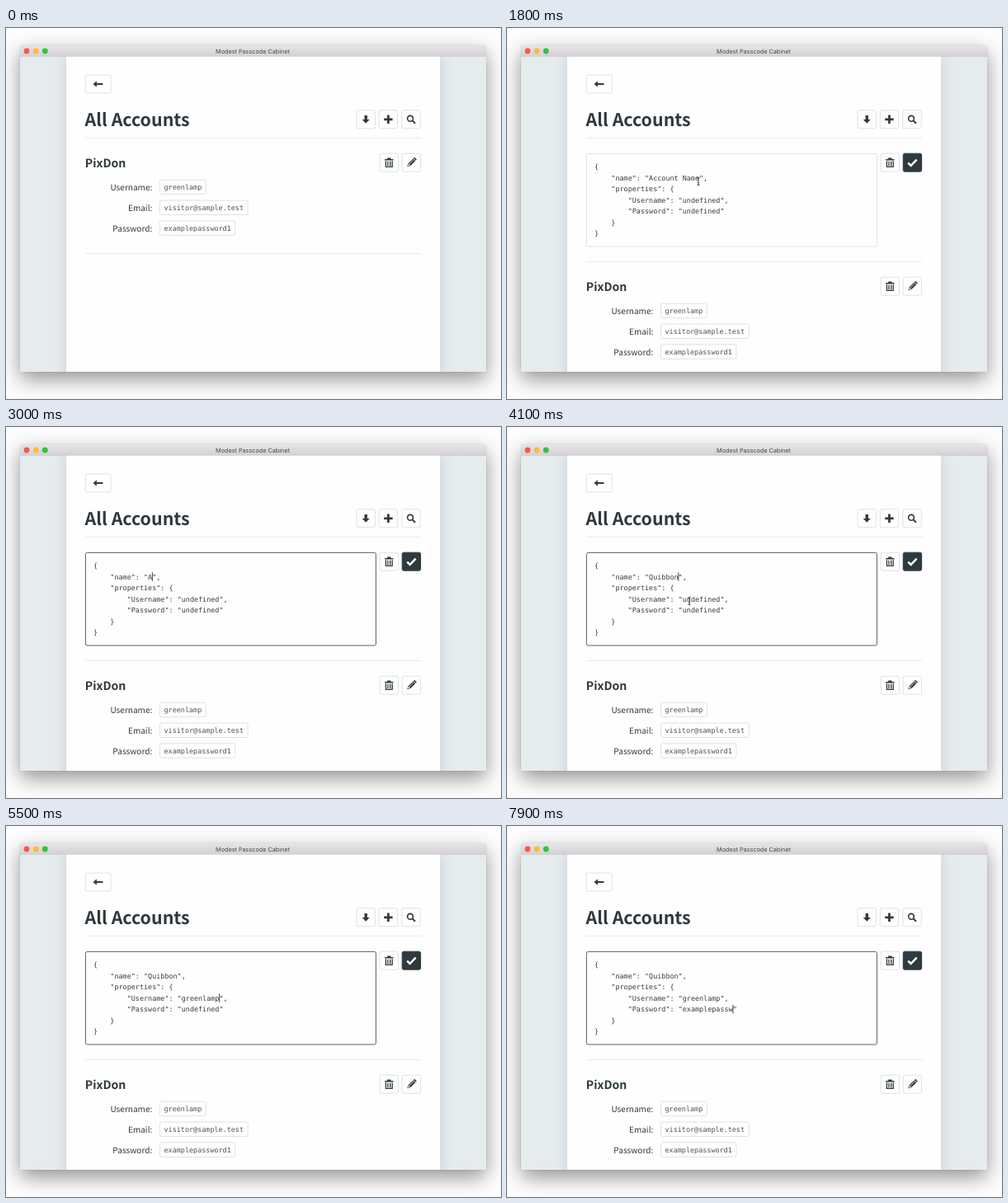
An HTML page that plays this animation: 600 by 450 pixels, repeating every 8000 ms.

```html
<!DOCTYPE html>
<html lang="en">
<head>
<meta charset="utf-8">
<title>Accounts</title>
<style>
  html, body { margin: 0; width: 100%; height: 100%; overflow: hidden; background: #fdfdfd; }
  .window {
    position: absolute; left: 17px; top: 21px; width: 565px; height: 396px;
    border-radius: 4px 4px 1px 1px; overflow: hidden; background: #e6ebee;
  }
  .shadow {
    position: absolute; left: 17px; top: 21px; width: 565px; height: 396px; border-radius: 4px;
    box-shadow: 0 9px 24px rgba(0,0,0,.42), 0 0 1px rgba(0,0,0,.4);
  }
  .bar {
    position: absolute; left: 0; top: 0; width: 100%; height: 13px;
    background: linear-gradient(#e7e5e7, #d3d1d3); box-shadow: 0 .5px 0 #b9b7b9;
  }
  .panel {
    position: absolute; left: 56px; top: 13px; width: 452.5px; height: 390px;
    background: #fefefe; box-shadow: 0 0 14px rgba(70,90,100,.2);
  }
  svg { position: absolute; left: 0; top: 0; display: block; text-rendering: geometricPrecision; }
  text { fill: #2f393d; font-family: "Noto Sans CJK JP", "Noto Sans CJK SC", "Noto Sans", sans-serif; }
  .ui { font-family: Inter, sans-serif; }
  .mono { font: 8.45px "DejaVu Sans Mono", monospace; fill: #343d41; }
  .badge .mono { fill: #4b555a; }
  .label { font-size: 10.07px; text-anchor: end; }
  .box { fill: #fefefe; stroke: #dee2e5; stroke-width: 1; }
  .rule { stroke: #e7eaed; }
  .ink { fill: #2f393d; }
  .line { fill: none; stroke: #2f393d; }
</style>
</head>
<body>
<div class="shadow"></div>
<div class="window"><div class="panel"></div><div class="bar"></div></div>
<svg width="600" height="450" viewBox="0 0 600 450">
  <defs>
    <clipPath id="view"><rect x="17" y="34" width="565" height="383"/></clipPath>
    <rect id="btn" x="-11.2" y="-11" width="22.4" height="22" rx="2"/>
    <g id="trash">
      <use href="#btn" class="box"/>
      <path class="ink" d="M-5.2-4.1H-2.2V-5.6H2.2V-4.1H5.2V-2.7H-5.2Z"/>
      <path class="line" stroke-width="1.3" d="M-3.9-2V5.2H3.9V-2M-1.4-1.5V4M1.4-1.5V4"/>
    </g>
    <g id="pencil">
      <use href="#btn" class="box"/>
      <g transform="rotate(45)">
        <path class="ink" d="M-1.9-7.2H1.9V-5.5H-1.9ZM-1.9-4.8H1.9V3.4L0 7.3L-1.9 3.4Z"/>
        <path d="M-.5-4V3M.7 3.6L0 5.2L-.7 3.6Z" fill="#fefefe" stroke="#fefefe" stroke-width=".7"/>
      </g>
    </g>
  </defs>

  <circle cx="25" cy="28" r="3.4" fill="#f9564f"/>
  <circle cx="36.2" cy="28" r="3.4" fill="#fbbc36"/>
  <circle cx="47.3" cy="28" r="3.4" fill="#2fc441"/>
  <text class="ui" x="299" y="30.7" font-size="7.25" text-anchor="middle" style="fill:#484648">Modest Passcode Cabinet</text>

  <g clip-path="url(#view)">
    <rect class="box" x="96.2" y="57" width="31" height="22" rx="2"/>
    <path class="ink" d="M105.6 68l4.3-3.7v2.6h7.5v2.2h-7.5v2.6z"/>
    <text x="95.6" y="119.4" font-size="21.4" font-weight="700">All Accounts</text>
    <path class="rule" d="M96 133.5H503.5"/>

    <g transform="translate(436.2 110.8)">
      <use href="#btn" class="box"/>
      <path class="ink" d="M0 4.9l-4.5-4.7h2.8v-4.9h3.4v4.9h2.8z"/>
    </g>
    <g transform="translate(463.4 110.8)">
      <use href="#btn" class="box" id="add"/>
      <path class="line" stroke-width="2.7" d="M-5.2 0H5.2M0-5.2V5.2"/>
    </g>
    <g transform="translate(491 110.8)">
      <use href="#btn" class="box"/>
      <circle class="line" stroke-width="1.6" cx="-1" cy="-1" r="3.4"/>
      <path class="line" stroke-width="2" d="M1.6 1.6L5 5"/>
    </g>

    <g id="editor">
      <rect id="area" class="box" x="96.4" y="152.4" width="352" height="112.6" rx="2"/>
      <rect id="sel" height="12" fill="#b4d6fd"/>
      <g id="code"></g>
      <rect id="caret" width=".8" height="10.4" fill="#111"/>
      <use href="#trash" x="464.3" y="163.2"/>
      <g transform="translate(491.4 163.2)">
        <use href="#btn" fill="#2f3a3f" stroke="#2f3a3f"/>
        <path d="M-5.2.4L-1.8 3.8L5.2-3.6" fill="none" stroke="#fff" stroke-width="2.5"/>
      </g>
      <path class="rule" d="M96 283.5H503.5"/>
    </g>

    <g id="account">
      <text x="95.8" y="169.4" font-size="14.1" font-weight="600">PixDon</text>
      <use href="#trash" x="464.3" y="163.2"/>
      <use href="#pencil" x="491.4" y="163.2"/>
      <g id="fields"></g>
      <path class="rule" d="M96 273.5H503.5"/>
    </g>

    <g id="tip">
      <path d="M463.4 123.6l3.6 4h-7.2z" fill="#111416"/>
      <rect x="436" y="127" width="55" height="15.4" rx="2" fill="#111416"/>
      <text class="ui" x="463.5" y="137.2" font-size="6.7" font-weight="500" text-anchor="middle" style="fill:#fff">Add Account</text>
    </g>

    <g id="mouse">
      <path id="arrow" d="M0 0V8.2L1.9 6.5L3.2 9.5L4.6 8.9L3.3 6H5.8Z" fill="#111" stroke="#fff" stroke-width=".6"/>
      <path id="hand" d="M-1.3-3.4Q-.6-4.4 0-3.4V-.6L3-.1Q4 .2 3.8 1.4L3 4.6H-1L-3.5 1.4Q-3.3 .2-1.3 1.2Z" fill="#fff" stroke="#111" stroke-width=".8"/>
      <path id="beam" d="M-1.7-4.8Q0-4.8 0-3.6Q0-4.8 1.7-4.8M0-4V4M-1.7 4.8Q0 4.8 0 3.6Q0 4.8 1.7 4.8M-1 1.6H1" fill="none" stroke="#222" stroke-width=".8"/>
    </g>
  </g>
</svg>
<script>
const LOOP = 8000, STEP = 100;
const PITCH = 8.45 * 0.602, LEFT = 106, LINE = 13.55;
const $ = id => document.getElementById(id);
const set = (el, attrs) => { for (const k in attrs) el.setAttribute(k, attrs[k]); return el; };
const add = (parent, tag, attrs, text = "") => {
  const el = set(document.createElementNS("http://www.w3.org/2000/svg", tag), attrs);
  el.textContent = text;
  return parent.appendChild(el);
};
const show = (id, on) => { $(id).style.display = on ? "" : "none"; };
const colX = col => LEFT + col * PITCH;
const rowY = row => 171 + row * LINE;

[["Username:", "greenlamp"], ["Email:", "visitor@sample.test"], ["Password:", "examplepassword1"]]
  .forEach(([label, value], i) => {
    const g = add($("fields"), "g", { class: "badge", transform: `translate(0 ${i * 24.8})` });
    add(g, "text", { class: "label", x: 177.3, y: 197 }, label);
    add(g, "rect", { class: "box", x: 186.5, y: 184.3, width: value.length * PITCH + 10, height: 17.4, rx: 2 });
    add(g, "text", { class: "mono", x: 191.5, y: 196.2 }, value);
  });

const indents = [0, 4, 4, 8, 8, 4, 0];
const rows = indents.map((n, i) => add($("code"), "text", { class: "mono", x: colX(n), y: rowY(i) }));

// One key press time per character
const inputs = {
  name: { row: 1, col: 13, old: "Account Name", word: "Quibbon", from: 3100,
    keys: [3300, 3500, 3600, 3600, 3700, 3700, 3800] },
  user: { row: 3, col: 21, old: "undefined", word: "greenlamp", from: 4700,
    keys: [4700, 4800, 4900, 5100, 5200, 5300, 5400, 5400, 5500] },
  pass: { row: 4, col: 21, old: "undefined", word: "examplepassword1", from: 6400,
    keys: [6400, 6600, 6900, 7000, 7100, 7200, 7300, 7600, 7600, 7700, 7700, 7900] }
};
const valueAt = (f, t) => {
  if (t >= f.from) return f.word.slice(0, f.keys.filter(k => k <= t).length);
  return f === inputs.name && t >= 3000 ? "A" : f.old;
};

// Pointer stops: time, x, y
const path = [
  [400, 555.5, 242.5], [600, 555.5, 242.5], [1150, 464, 120], [1450, 464, 120],
  [1800, 232, 186], [2000, 232, 186], [2700, 177, 183], [3950, 177, 183],
  [4100, 221, 211], [5650, 221, 211], [6000, 232, 225.5], [LOOP, 232, 225.5]
];
const pointerAt = t => {
  const i = Math.max(1, path.findIndex(p => p[0] > t));
  const [t0, x0, y0] = path[i - 1], [t1, x1, y1] = path[i];
  const k = Math.min(1, Math.max(0, (t - t0) / (t1 - t0)));
  const e = t0 === 2000 ? k : k * k * (3 - 2 * k);
  return [x0 + (x1 - x0) * e, y0 + (y1 - y0) * e];
};
const within = (t, a, b) => t >= a && t < b;

function drawMouse(t, x, y) {
  const visible = within(t, 400, 3000) || within(t, 4000, 4700) || within(t, 5700, 6400);
  const hand = within(t, 1100, 1500);
  const beam = t >= 1500 && x < 448 && y > 152;
  show("mouse", visible);
  show("hand", hand);
  show("beam", beam);
  show("arrow", !hand && !beam);
  set($("mouse"), { transform: `translate(${x} ${y})` });
}

function drawEditor(t, x) {
  const { name, user, pass } = inputs;
  const [n, u, p] = [name, user, pass].map(f => valueAt(f, t));
  ["{", `"name": "${n}",`, '"properties": {', `"Username": "${u}",`, `"Password": "${p}"`, "}", "}"]
    .forEach((s, i) => { rows[i].textContent = s; });

  let sel = null;
  if (within(t, 2000, 3000)) {
    const start = Math.max(14, Math.min(25, Math.round((x - LEFT) / PITCH)));
    sel = [1, start, 25 - start];
  } else if (within(t, 4300, user.from)) sel = [user.row, user.col, 9];
  else if (within(t, 6200, pass.from)) sel = [pass.row, pass.col, 9];
  show("sel", sel && sel[2]);
  if (sel) set($("sel"), { x: colX(sel[1]), y: rowY(sel[0]) - 9, width: sel[2] * PITCH });

  const field = t < 4300 ? name : t < 6200 ? user : pass;
  show("caret", t >= 1900 && !sel);
  set($("caret"), { x: colX(field.col + valueAt(field, t).length) - .3, y: rowY(field.row) - 8.2 });
  $("area").style.stroke = t >= 1900 ? "#586166" : "";
}

function draw(t) {
  const [x, y] = pointerAt(t), open = t >= 1400;
  show("editor", open);
  set($("account"), { transform: `translate(0 ${open ? 150 : 0})` });
  $("add").style.fill = within(t, 1100, 1600) ? "#d5dadd" : "";
  show("tip", within(t, 1200, 1500));
  $("tip").style.opacity = t < 1300 ? .6 : 1;
  drawEditor(t, x);
  drawMouse(t, x, y);
}

let start;
function tick(now) {
  start ??= now;
  draw(Math.floor((now - start) % LOOP / STEP) * STEP);
  requestAnimationFrame(tick);
}
draw(0);
requestAnimationFrame(tick);
</script>
</body>
</html>
```
